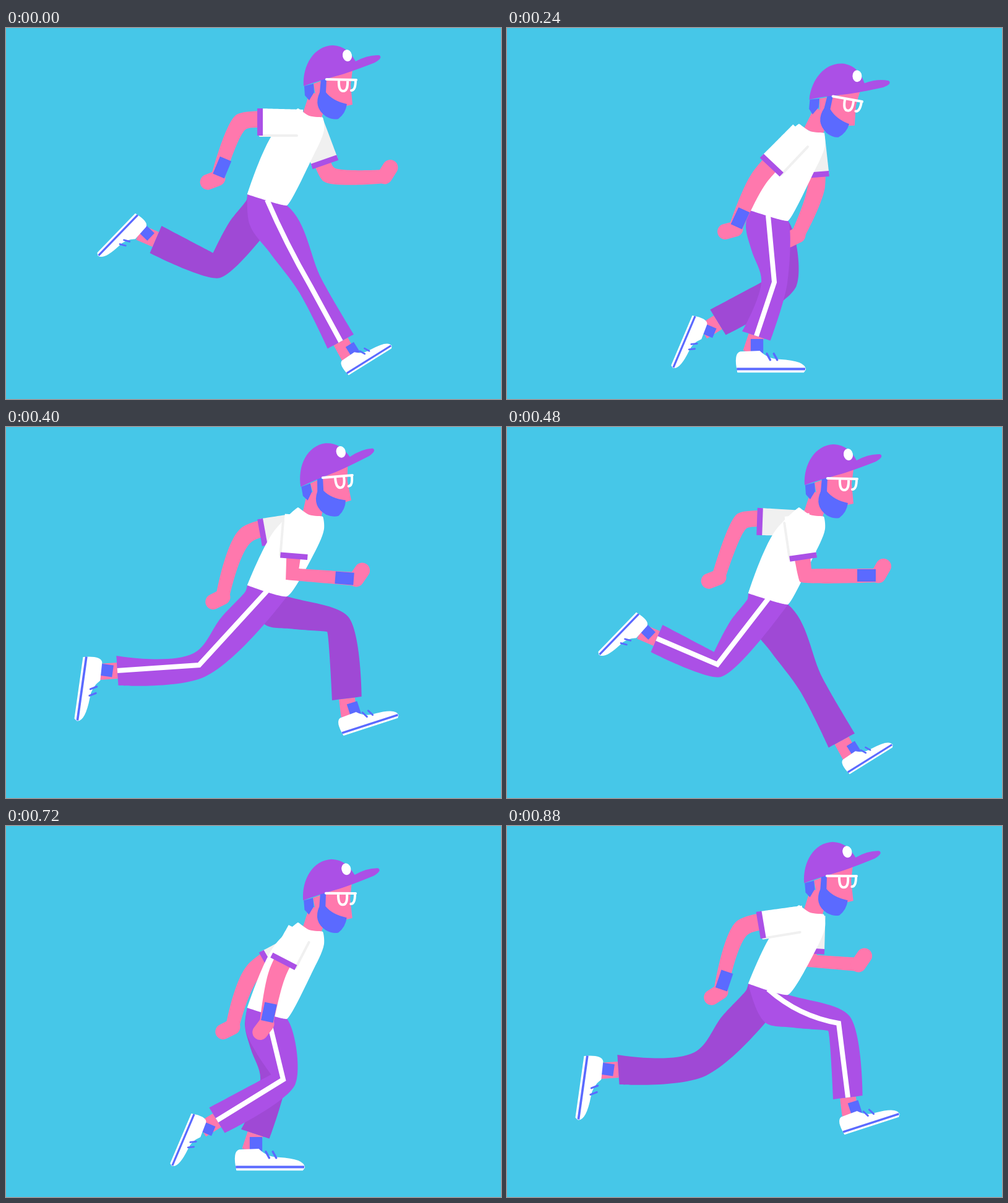
An HTML page with a canvas that plays this animation: 800x600 px, repeating every 0.96 s.

```html
<!DOCTYPE html>
<html lang="en">
<head>
<meta charset="utf-8">
<title>Run cycle</title>
<style>
  html, body { margin: 0; width: 100%; height: 100%; overflow: hidden; background: #46c7e8; }
  canvas { display: block; width: 800px; height: 600px; }
</style>
</head>
<body>
<canvas id="stage" width="800" height="600"></canvas>
<script>
const ctx = document.getElementById('stage').getContext('2d');
const SKY = '#46c7e8', PURPLE = '#ab50e6', PLUM = '#9f49d5', PINK = '#ff78ad',
      BLUE = '#5b6aff', WHITE = '#fff', GREY = '#f0f0f0';

const LOOP = 960;
// Start time of each drawing, and which drawings are key poses.
const STARTS = [0, 40, 80, 160, 200, 240, 280, 320, 400, 480, 520, 560, 640, 680, 720, 800, 840, 880];
const KEYS = [0, 2, 5, 8, 9, 11, 14, 17];

// Joints of the runner. foot: angle, size. body: hip height, neck height, head tilt.
// The far leg repeats the near one half a cycle later.
const POSES = [
  { knee: [492, 417], hem: [541, 507], foot: [-32, 0.86], body: [278, 140, 0],
    arm: [[380, 152], [342, 243]], farArm: [[522, 237], [612, 240]] },
  { knee: [530, 403], hem: [503, 498], foot: [0, 0.97], body: [303, 169, 6],
    arm: [[383, 203], [337, 280]], farArm: [[505, 250], [560, 306]] },
  { knee: [432, 411], hem: [403, 498], foot: [0, 1.13], body: [303, 165, 9],
    arm: [[406, 245], [369, 325]], farArm: [[500, 256], [470, 335]] },
  { knee: [312, 385], hem: [180, 394], foot: [98, 1.06], body: [265, 140, -6],
    arm: [[463, 238], [566, 246]], farArm: [[388, 175], [350, 275]] },
  { knee: [340, 384], hem: [242, 342], foot: [134, 0.93], body: [278, 140, 0],
    arm: [[483, 240], [600, 240]], farArm: [[380, 152], [342, 243]] },
  { knee: [376, 439], hem: [293, 416], foot: [154, 0.98], body: [303, 169, 6],
    arm: [[480, 280], [508, 330]], farArm: [[384, 202], [338, 272]] },
  { knee: [448, 410], hem: [341, 476], foot: [113, 0.92], body: [303, 166, -1],
    arm: [[438, 240], [421, 320]], farArm: [[400, 235], [366, 325]] },
  { knee: [536, 319], hem: [551, 439], foot: [-18, 0.97], body: [264, 138, -1],
    arm: [[380, 165], [345, 268]], farArm: [[490, 218], [568, 224]] }
];

const SHOE = new Path2D('M2 0Q-4 -27 6 -30L34 -31Q46 -19 62 -19Q100 -17 100 -4L97 0Z');
const FACE = new Path2D('M497 90L560 68L557 92L560 124L550 126L528 140L503 125Z');
const HAIR = new Path2D('M482 94L497 90L498 104L490 117L483 109Z');
const BEARD = new Path2D('M509 82L518 84L517 104Q528 118 551 123Q549 138 537 147Q528 149 517 143Q496 128 507 104Z');
const CAP = new Path2D('M481 94C479 60 498 29 528 28C546 29 556 38 565 54Q585 43 603 44Q610 48 596 56Q560 70 540 76Q505 85 481 94Z');
const GLASSES = new Path2D('M518 83L566 84M538 84Q537 102 545 102Q553 102 552 84M565 84Q565 101 558 101');

const clamp = (v, lo, hi) => Math.max(lo, Math.min(hi, v));
const add = (a, b, k = 1) => [a[0] + b[0] * k, a[1] + b[1] * k];
const lerp = (a, b, f) => Array.isArray(a) ? a.map((v, i) => lerp(v, b[i], f)) : a + (b - a) * f;
const blend = (a, b, f) => Object.fromEntries(Object.keys(a).map(k => [k, lerp(a[k], b[k], f)]));
const unit = v => {
  const d = Math.hypot(...v) || 1;
  return [v[0] / d, v[1] / d];
};
const dir = (a, b) => unit(add(b, a, -1));
const front = d => [d[1], -d[0]];
const turn = ([x, y], deg) => {
  const a = deg * Math.PI / 180, c = Math.cos(a), s = Math.sin(a);
  return [x * c - y * s, x * s + y * c];
};

// Closed curve through the points that keeps sharp turns sharp.
function fill(pts, color) {
  const n = pts.length, at = i => pts[(i + n) % n];
  const len = i => Math.hypot(...add(at(i + 1), at(i), -1));
  const handle = (i, edge) => {
    const u = dir(at(i - 1), at(i)), v = dir(at(i), at(i + 1));
    const bend = clamp((u[0] * v[0] + u[1] * v[1] - 0.1) / 0.5, 0, 1);
    const reach = Math.min(edge, 2 * len(i - 1), 2 * len(i));
    return unit(add(u, v)).map(c => c * bend * reach * 0.33);
  };
  ctx.beginPath();
  ctx.moveTo(...at(0));
  for (let i = 0; i < n; i++) {
    const a = at(i), b = at(i + 1), d = len(i);
    ctx.bezierCurveTo(...add(a, handle(i, d)), ...add(b, handle((i + 1) % n, d), -1), ...b);
  }
  ctx.fillStyle = color;
  ctx.fill();
}

function fillPath(path, color) {
  ctx.fillStyle = color;
  ctx.fill(path);
}

function line(pts, color, width, cap = 'butt') {
  ctx.beginPath();
  pts.forEach(p => ctx.lineTo(...p));
  ctx.strokeStyle = color;
  ctx.lineWidth = width;
  ctx.lineCap = cap;
  ctx.stroke();
}

// Tapered tube along a chain of joints.
function limb(joints, widths, color) {
  const side = k => joints.map((p, i) => {
    const a = joints[i - 1], b = joints[i + 1];
    const n = unit(add(a ? front(dir(a, p)) : [0, 0], b ? front(dir(p, b)) : [0, 0]));
    return add(p, n, k * widths[i] / 2);
  });
  fill([...side(1), ...side(-1).reverse()], color);
}

function drawShoe(ankle, [deg, size]) {
  const sock = 30 - 0.13 * deg;
  ctx.save();
  ctx.translate(...ankle);
  ctx.rotate(deg * Math.PI / 180);
  ctx.scale(size, size);
  ctx.translate(-21, 28);
  line([[sock, -48], [sock, -26]], BLUE, 18);
  fillPath(SHOE, WHITE);
  line([[1, -5], [99, -5]], BLUE, 3.5);
  for (const x of [44, 54]) line([[x, -27], [x + 5, -18]], BLUE, 3, 'round');
  ctx.restore();
}

function drawLeg({ knee, hem, foot }, hip, near) {
  const u = dir(hip, knee), v = dir(knee, hem);
  const nThigh = front(u), nShin = front(v), nKnee = unit(add(nThigh, nShin));
  const ankle = add(hem, v, 29), mid = lerp(hip, knee, 0.5);
  line([hem, ankle], PINK, 26);
  drawShoe(ankle, foot);
  fill([
    add(hip, [32, 9]), add(knee, nKnee, 21), add(hem, nShin, 24), add(hem, nShin, -24),
    add(knee, nKnee, -21), add(mid, nThigh, -31 - 8 * u[0]),
    add(lerp(hip, knee, 0.15), nThigh, -36 - 16 * u[0]), add(hip, [-32, -9])
  ], near ? PURPLE : PLUM);
  if (!near) return;
  const bow = add(mid, nThigh, -30 * Math.max(0, u[0] - 0.3));
  ctx.beginPath();
  ctx.moveTo(...hip);
  ctx.quadraticCurveTo(...bow, ...knee);
  ctx.lineTo(...hem);
  ctx.strokeStyle = WHITE;
  ctx.lineWidth = 8;
  ctx.lineCap = 'butt';
  ctx.stroke();
}

function drawArm(shoulder, [elbow, wrist], near) {
  const up = dir(shoulder, elbow), fore = dir(elbow, wrist);
  const curl = -60 * clamp(2 * fore[0], -1, 1);
  limb([shoulder, elbow, wrist], [30, 28, 22], PINK);
  line([wrist, add(wrist, turn(fore, curl), 17)], PINK, 25, 'round');
  if (near) line([add(wrist, fore, -34), add(wrist, fore, -4)], BLUE, 20);

  const cuff = lerp(shoulder, elbow, near ? 0.66 : 0.75), n = front(up);
  limb([add(shoulder, up, -10), cuff], [40, 44], near ? WHITE : GREY);
  const side = up[0] < -0.2 ? 22 : -22;
  if (near) line([add(cuff, n, side), add(shoulder, n, side)], GREY, 4, 'round');
  line([add(cuff, n, 22), add(cuff, n, -22)], PURPLE, 9);
}

function drawShirt(neck, hip) {
  const from = (x, y) => add(neck, [x, y]);
  fill([
    from(-22, -10), from(-4, 2), from(18, 5), from(20, 25), from(0, 72),
    add(hip, [32, 9]), add(hip, [-32, -9]), from(-62, 30)
  ], WHITE);
}

function drawHead(neck, tilt) {
  ctx.save();
  ctx.translate(neck[0] + 12, neck[1]);
  ctx.rotate(tilt * Math.PI / 180);
  ctx.translate(-506, -140);
  fillPath(FACE, PINK);
  fillPath(HAIR, BLUE);
  fillPath(BEARD, BLUE);
  fillPath(CAP, PURPLE);
  ctx.beginPath();
  ctx.ellipse(551.5, 44.5, 7.5, 9.5, -0.2, 0, 7);
  ctx.fillStyle = WHITE;
  ctx.fill();
  ctx.strokeStyle = WHITE;
  ctx.lineWidth = 4;
  ctx.lineCap = 'round';
  ctx.stroke(GLASSES);
  ctx.restore();
}

function drawRunner(near, far) {
  const [hipY, neckY, tilt] = near.body;
  const hip = [422, hipY], neck = [494, neckY];
  ctx.fillStyle = SKY;
  ctx.fillRect(0, 0, 800, 600);
  drawLeg(far, hip, false);
  drawArm(add(neck, [0, 16]), near.farArm, false);
  drawLeg(near, hip, true);
  line([add(neck, turn([12, -32], tilt)), add(neck, [0, 4])], PINK, 31);
  drawShirt(neck, hip);
  drawArm(add(neck, [-24, 12]), near.arm, true);
  drawHead(neck, tilt);
}

function drawStep(step) {
  const i = KEYS.findLastIndex(k => k <= step);
  const f = (step - KEYS[i]) / ((KEYS[i + 1] ?? STARTS.length) - KEYS[i]);
  const pose = k => blend(POSES[k % 8], POSES[(k + 1) % 8], f);
  drawRunner(pose(i), pose(i + 4));
}

let shown = -1;
const origin = performance.now();
function tick() {
  const t = (performance.now() - origin) % LOOP;
  const step = STARTS.findLastIndex(s => s <= t);
  if (step !== shown) drawStep(shown = step);
  requestAnimationFrame(tick);
}
tick();
</script>
</body>
</html>
```
